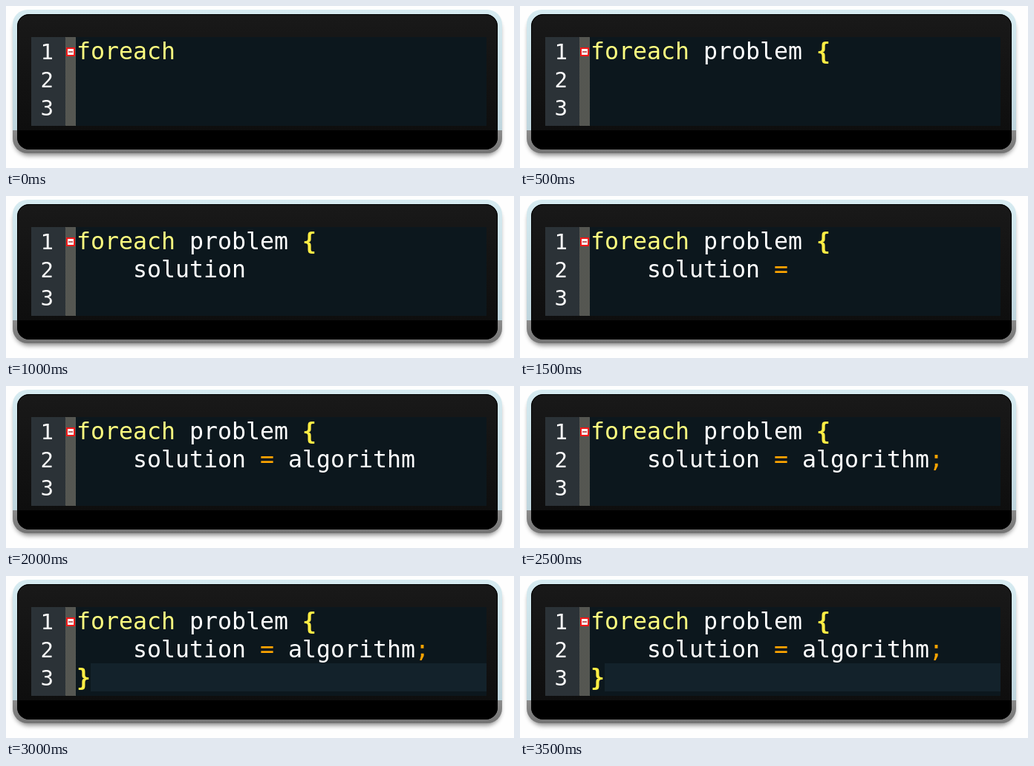
An HTML page that plays this animation: 684x219 px, repeating every 4 s.

```html
<!DOCTYPE html>
<html lang="en">
<head>
<meta charset="utf-8">
<title>foreach problem</title>
<style>
  html, body { margin: 0; width: 100%; height: 100%; overflow: hidden; background: #fefefe; }
  svg { display: block; }
  text { font: 31.56px "DejaVu Sans Mono", monospace; white-space: pre; }
  .line-number { font-size: 29px; fill: #fff; }
  .bold { font-weight: bold; }
</style>
</head>
<body>
<svg width="684" height="219" viewBox="0 0 684 219">
  <defs>
    <linearGradient id="glass" x2="0" y2="1">
      <stop offset="0" stop-color="#d6ebf1"/>
      <stop offset=".84" stop-color="#bfd5dd"/>
      <stop offset=".84" stop-color="#8b8b8b"/>
      <stop offset="1" stop-color="#747474"/>
    </linearGradient>
    <linearGradient id="panel" x2="0" y2="1">
      <stop offset="0" stop-color="#191919"/>
      <stop offset=".858" stop-color="#0e0e0e"/>
      <stop offset=".858" stop-color="#000"/>
    </linearGradient>
    <pattern id="checker" width="2" height="2" patternUnits="userSpaceOnUse">
      <path fill="#414442" d="M0 0h2v2h-2z"/>
      <path fill="#696961" d="M0 0h1v1h-1zM1 1h1v1h-1z"/>
    </pattern>
    <filter id="blur" x="-5%" y="-10%" width="110%" height="120%">
      <feGaussianBlur stdDeviation="3"/>
    </filter>
  </defs>

  <rect x="11" y="12" width="655" height="190" rx="20" opacity=".45" filter="url(#blur)"/>
  <rect x="9" y="5" width="659" height="194" rx="20" fill="url(#glass)"/>
  <rect x="15" y="11" width="647" height="183" rx="16" fill="url(#panel)"/>
  <rect x="15.5" y="11.5" width="646" height="182" rx="15.5" fill="none" stroke="#000"/>

  <rect x="34" y="42" width="613" height="120" fill="#0c171d"/>
  <rect x="34" y="42" width="46" height="120" fill="#2b3237"/>
  <rect x="80" y="42" width="14" height="120" fill="url(#checker)"/>
  <rect id="current" x="114" y="118" width="533" height="38" fill="#13222b"/>
  <rect x="82" y="57" width="10" height="10" fill="#fff" stroke="#f01818" stroke-width="2"/>
  <path d="M84 62h6" stroke="#a33" stroke-width="1.5"/>
  <g id="code"></g>
</svg>
<script>
const LOOP = 4000, CELL = 19, ROW = 38, LEFT = 95, BASELINE = 72;
const code = document.getElementById("code");
const current = document.getElementById("current");

function addText(content, x, row, fill, className = "") {
  const node = document.createElementNS("http://www.w3.org/2000/svg", "text");
  node.textContent = content;
  node.setAttribute("x", x);
  node.setAttribute("y", BASELINE + row * ROW);
  node.setAttribute("fill", fill);
  node.setAttribute("class", className);
  code.append(node);
  return node;
}

for (let row = 0; row < 3; row++) addText(row + 1, 46.5, row, "#fff", "line-number");

// text, column, row, colour, time of appearance, class
const tokens = [
  ["foreach", 0, 0, "#ffff80", 0],
  ["problem", 8, 0, "#fff", 500],
  ["{", 16, 0, "#ffee44", 500, "bold"],
  ["solution", 4, 1, "#fff", 1000],
  ["=", 13, 1, "#ffa500", 1500],
  ["algorithm", 15, 1, "#fff", 2000],
  [";", 24, 1, "#ffa500", 2500],
  ["}", 0, 2, "#ffee44", 3000, "bold"],
].map(([content, column, row, fill, start, className]) => ({
  start,
  node: addText(content, LEFT + column * CELL, row, fill, className),
}));
tokens.push({ start: 3000, node: current });

function draw() {
  const time = performance.now() % LOOP;
  for (const { start, node } of tokens)
    node.setAttribute("visibility", time >= start ? "visible" : "hidden");
  requestAnimationFrame(draw);
}
draw();
</script>
</body>
</html>
```
